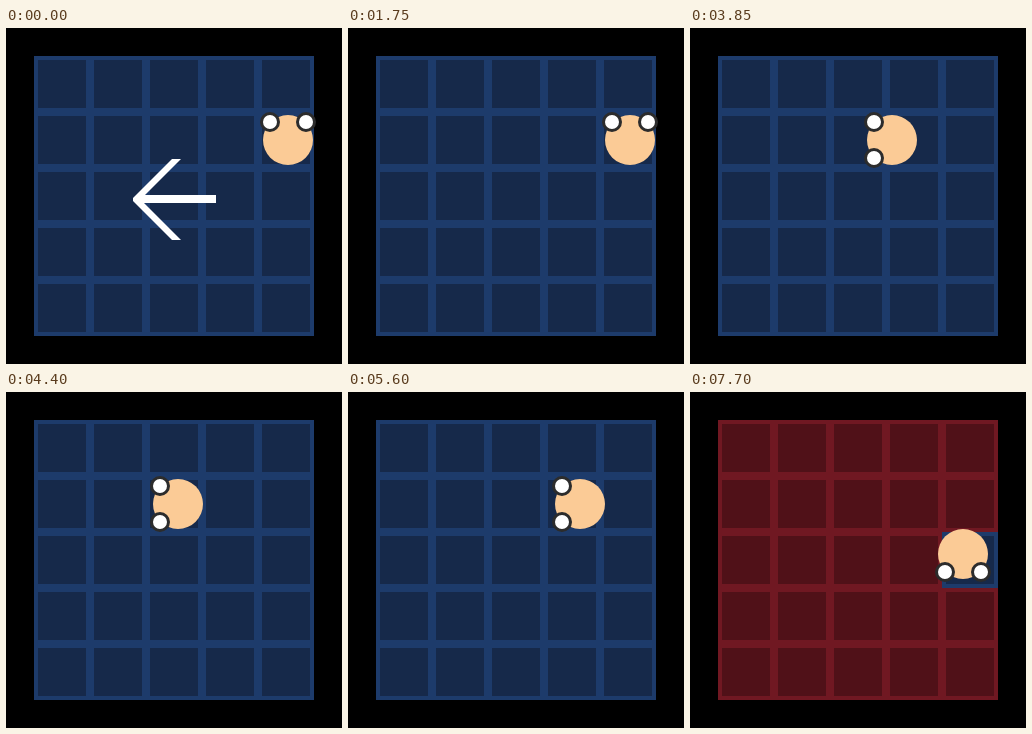
These frames come from a looping animation (336x336 px, 8000 ms). An HTML page:

```html
<!DOCTYPE html>
<html lang="en">
<head>
<meta charset="utf-8">
<title>Grid steps</title>
<style>
  html, body { margin: 0; width: 100%; height: 100%; overflow: hidden; background: #000; }
  svg { display: block; width: 100vw; height: 100vh; }
  .cell { fill: #16294a; stroke: #1d3b6b; stroke-width: 4; }
  .cell.hot { fill: #501118; stroke: #701822; }
  .eye { fill: #fff; stroke: #2c2c2c; stroke-width: 3; }
  #arrow, #stay { visibility: hidden; }
</style>
</head>
<body>
<svg viewBox="0 0 336 336">
  <g id="grid" shape-rendering="crispEdges"></g>
  <g id="player">
    <circle r="25" fill="#fbcb96"/>
    <circle class="eye" cx="-18" cy="-18" r="8.5"/>
    <circle class="eye" cx="18" cy="-18" r="8.5"/>
  </g>
  <path id="arrow" fill="#fff" d="M166 131H175L139 167H210V175H138L175 212H166L127 173V170Z"/>
  <circle id="stay" cx="164" cy="164" r="36" fill="none" stroke="#fff" stroke-width="8"/>
</svg>
<script>
const LOOP = 8000, TICK = 50, STEP = 10, SIZE = 56, EDGE = 28;
const byId = id => document.getElementById(id);
const grid = byId('grid'), player = byId('player'), arrow = byId('arrow'), stay = byId('stay');

// Arrow turns in degrees from "left"; null is the stay sign.
const cues = [0, 0, 180, 180, -90, 0, -45, -135, 45, null];
const CUE_EVERY = 200, CUE_ON = 150;

// Safe cell [column, row] for each beat.
const safe = [[3, 1], [2, 1], [3, 1], [4, 1], [4, 2]];
const BEAT_START = 2900, BEAT_EVERY = 1200, BEAT_ON = 300;

// Player facing: [dx, dy, turn from "up"].
const LEFT = [-1, 0, -90], RIGHT = [1, 0, 90], DOWN = [0, 1, 180];
// Key presses: [time, direction, steps].
const moves = [
  [2250, LEFT, 3], [2800, LEFT, 2], [3750, LEFT, 6],
  [4800, RIGHT, 7], [5450, LEFT, 1],
  [6000, RIGHT, 6], [6800, LEFT, 1], [7350, DOWN, 5]
];
const MAX_X = 283;

const cells = [];
for (let row = 0; row < 5; row++) {
  for (let col = 0; col < 5; col++) {
    const r = document.createElementNS('http://www.w3.org/2000/svg', 'rect');
    r.setAttribute('x', EDGE + col * SIZE + 2);
    r.setAttribute('y', EDGE + row * SIZE + 2);
    r.setAttribute('width', SIZE - 4);
    r.setAttribute('height', SIZE - 4);
    r.setAttribute('class', 'cell');
    grid.append(r);
    cells.push(r);
  }
}

function drawCue(t) {
  const i = Math.floor(t / CUE_EVERY);
  const on = i < cues.length && t % CUE_EVERY < CUE_ON;
  const turn = cues[i];
  arrow.style.visibility = on && turn !== null ? 'visible' : 'hidden';
  stay.style.visibility = on && turn === null ? 'visible' : 'hidden';
  if (!on || turn === null) return;
  // Diagonal signs sit lower right, as their turned box keeps its corner.
  const shift = turn % 90 ? 18 : 0;
  arrow.setAttribute('transform', `translate(${shift} ${shift}) rotate(${turn} 168 168)`);
}

function drawGrid(t) {
  const since = t - BEAT_START;
  const on = since >= 0 && since % BEAT_EVERY < BEAT_ON;
  const [col, row] = on ? safe[Math.floor(since / BEAT_EVERY)] : [0, 0];
  cells.forEach((c, i) => c.classList.toggle('hot', on && i !== row * 5 + col));
}

function drawPlayer(t) {
  let x = 282, y = 112, turn = 0;
  for (const [at, [dx, dy, face], count] of moves) {
    if (t < at) break;
    const n = Math.min(count, Math.floor((t - at) / TICK) + 1);
    x = Math.min(MAX_X, x + dx * n * STEP);
    y += dy * n * STEP;
    turn = face;
  }
  player.setAttribute('transform', `translate(${x} ${y}) rotate(${turn})`);
}

function draw(t) {
  drawCue(t);
  drawGrid(t);
  drawPlayer(t);
}

const start = performance.now();
function frame() {
  draw((performance.now() - start) % LOOP);
  requestAnimationFrame(frame);
}
draw(0);
requestAnimationFrame(frame);
</script>
</body>
</html>
```
